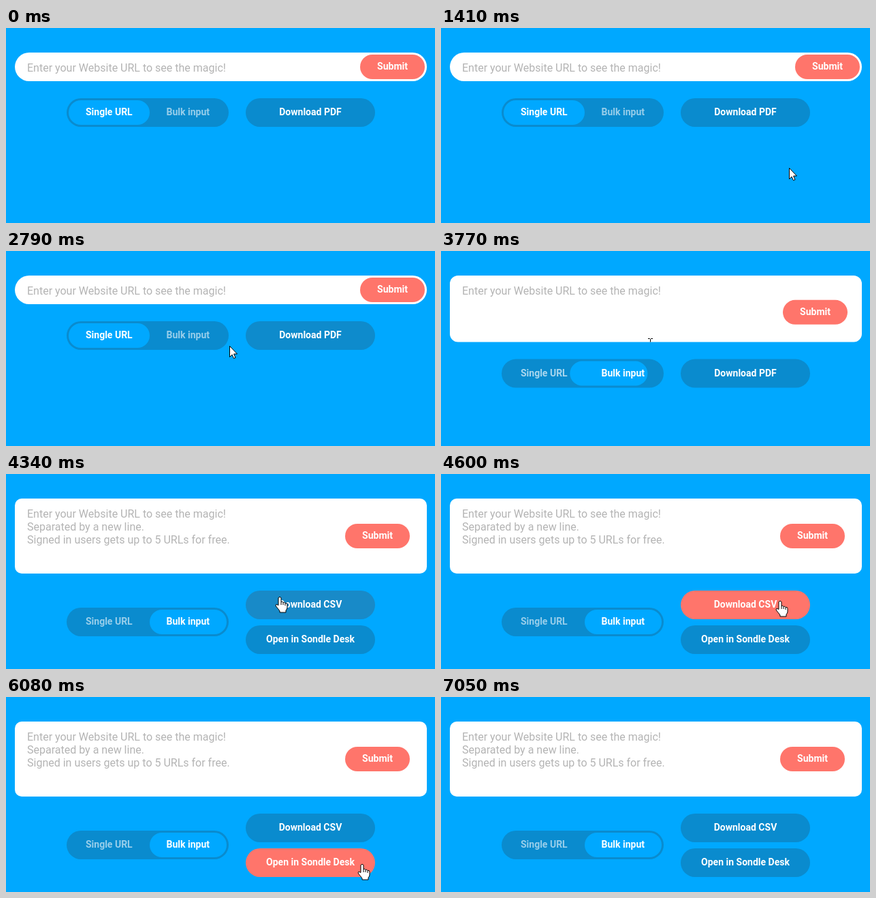
Write an HTML page with a canvas that moves like this. It is 630x286 px and loops after 7860 ms.

```html
<!DOCTYPE html>
<html lang="en">
<head>
<meta charset="utf-8">
<title>Single URL and bulk input form</title>
<style>
  html, body { margin: 0; width: 100%; height: 100%; overflow: hidden; background: #00a8ff; }
  canvas { display: block; }
</style>
</head>
<body>
<canvas id="stage" width="630" height="286"></canvas>
<script>
const ctx = document.getElementById('stage').getContext('2d');
const LOOP = 7860, EXPAND_AT = 3642, EXPAND_MS = 250, BULK_AT = 3890, FADE_MS = 150;
const BLUE = '#00a8ff', DARK = [10, 139, 206], CORAL = [255, 117, 107];

// Each move glides from the previous resting point; bow bends the path sideways
const ENTRY = { x: 514, y: 225 };
const MOVES = [
  { from: 1330, to: 1840, x: 499, y: 136, bow: 0 },
  { from: 2610, to: 3190, x: 308, y: 136, bow: -9.5, power: 6 },
  { from: 4173, to: 4610, x: 499, y: 186, bow: 18.5 },
  { from: 5200, to: 6080, x: 523, y: 245, bow: 28 },
  { from: 6650, to: 7050, x: 596, y: 282, bow: 0 }
];
const ARROW = new Path2D('M.5 .5V16.5L4 13L6.5 18.5L9 17.5L6.6 12H11.5Z');
const HAND = new Path2D('M-2 1.5Q0-1 2 1.5V7.5Q4 6.3 5 8.5Q7 7.3 8 9.5Q11 8.7 11 11.5V16Q11 18 9 20V23H0V21Q-2 18-5.5 14Q-7 9.5-2 12.5Z');
const KNUCKLES = new Path2D('M2 7.5V12M5 8.5V12M8 9.5V13');
const BEAM = new Path2D('M-3.5-7.5H-1L0-6.5L1-7.5H3.5M0-6.5V6.5M-3.5 7.5H-1L0 6.5L1 7.5H3.5');

const mix = (a, b, p) => a + (b - a) * p;
const clamp = v => Math.min(1, Math.max(0, v));

// The CSS "ease" curve, solved by bisection
function ease(x) {
  if (x <= 0 || x >= 1) return clamp(x);
  let lo = 0, hi = 1, s;
  for (let i = 0; i < 16; i++) {
    s = (lo + hi) / 2;
    if (.75 * s * (1 - s) + s ** 3 < x) lo = s; else hi = s;
  }
  return .3 * s * (1 - s) ** 2 + 3 * s * s * (1 - s) + s ** 3;
}

const easeOut = (p, power) => 1 - (1 - p) ** power;
const hover = (t, from, to) => ease((t - from) / FADE_MS) - ease((t - to) / FADE_MS);

function pill(x, y, w, h, fill, r = h / 2) {
  ctx.fillStyle = fill;
  ctx.beginPath();
  ctx.roundRect(x, y, w, h, r);
  ctx.fill();
}

function text(str, x, y, align = 'center', fill = '#fff', font = 'bold 14px') {
  ctx.font = font + ' Roboto, sans-serif';
  ctx.textAlign = align;
  ctx.fillStyle = fill;
  ctx.fillText(str, x, y);
}

function button(label, y, heat) {
  const rgb = DARK.map((c, i) => Math.round(mix(c, CORAL[i], heat)));
  pill(352, y, 190, 42, `rgb(${rgb})`);
  text(label, 447, y + 25);
}

function toggleLabel(label, x, y, strength) {
  text(label, x, y, 'left', `rgba(255,255,255,${mix(.58, 1, strength)})`);
}

function pointerAt(t) {
  if (t < MOVES[0].from || t >= MOVES.at(-1).to) return null;
  const i = MOVES.findLastIndex(move => move.from <= t);
  const start = MOVES[i - 1] ?? ENTRY, { from, to, x, y, bow, power = 1.5 } = MOVES[i];
  const p = easeOut(clamp((t - from) / (to - from)), power);
  const dx = x - start.x, dy = y - start.y;
  const bend = bow * Math.sin(Math.PI * p) / Math.hypot(dx, dy);
  return [start.x + dx * p - dy * bend, start.y + dy * p + dx * bend].map(Math.round);
}

function shape(path) {
  ctx.fillStyle = '#fff';
  ctx.fill(path);
  ctx.stroke(path);
}

function spinner(t) {
  const turn = t / 160;
  const arc = (color, a, b) => {
    ctx.strokeStyle = color;
    ctx.beginPath();
    ctx.arc(14.5, .5, 6, a, b);
    ctx.stroke();
  };
  ctx.lineWidth = 2;
  arc('#1488ec', 0, 7);
  arc('#4fc3ff', turn, turn + 1.8);
}

function drawPointer(t, boxBottom, targets) {
  const at = pointerAt(t);
  if (!at) return;
  const [x, y] = at;
  ctx.save();
  ctx.lineWidth = 1;
  ctx.strokeStyle = '#000';
  if (y < boxBottom + 4) {
    ctx.beginPath();
    ctx.rect(13, 36, 605, boxBottom - 36);
    ctx.clip();
    ctx.translate(x - .5, y);
    ctx.stroke(BEAM);
  } else {
    ctx.translate(x, y);
    if (targets.some(([l, top, w]) => x >= l && x <= l + w && y >= top && y <= top + 42)) {
      shape(HAND);
      ctx.stroke(KNUCKLES);
    } else {
      shape(ARROW);
      if (t > 5220 && t < 6000) spinner(t);
    }
  }
  ctx.restore();
}

function draw(t) {
  const open = ease((t - EXPAND_AT) / EXPAND_MS), bulk = t >= BULK_AT;
  const boxHeight = mix(42, 110, open), boxBottom = 36 + boxHeight;
  const row = boxBottom + 25, toggleY = bulk ? 196 : row;

  ctx.fillStyle = BLUE;
  ctx.fillRect(0, 0, 630, 286);

  pill(13, 36, 605, boxHeight, '#fff', mix(21, 10, open));
  const hints = ['Enter your Website URL to see the magic!'];
  if (bulk) hints.push('Separated by a new line.', 'Signed in users gets up to 5 URLs for free.');
  hints.forEach((line, i) => text(line, 31, 63.5 + 19 * i, 'left', '#b4b4b4', '16px'));

  const submitX = mix(520, 498, open), submitY = mix(39, 73, easeOut(open, 2));
  pill(submitX, submitY, 95, 36, `rgb(${CORAL})`);
  text('Submit', submitX + 47.5, submitY + 22);

  pill(89, toggleY, 238, 42, `rgb(${DARK})`);
  pill(mix(92, 211, open), toggleY + 3, mix(119, 113, open), 36, BLUE);
  toggleLabel('Single URL', 117, toggleY + 25, 1 - open);
  toggleLabel('Bulk input', 235.5, toggleY + 25, Math.max(open, hover(t, 2800, LOOP)));

  const targets = [[89, toggleY, 238], [352, row, 190]];
  if (bulk) {
    button('Download CSV', 171, hover(t, 4330, 5335));
    button('Open in Sondle Desk', 222, hover(t, 5480, 6722));
    targets.push([352, 222, 190]);
  } else {
    button('Download PDF', row, hover(t, 1690, 2665));
  }
  drawPointer(t, boxBottom, targets);
}

const start = performance.now();
function tick() {
  draw((performance.now() - start) % LOOP);
  requestAnimationFrame(tick);
}
tick();
</script>
</body>
</html>
```
